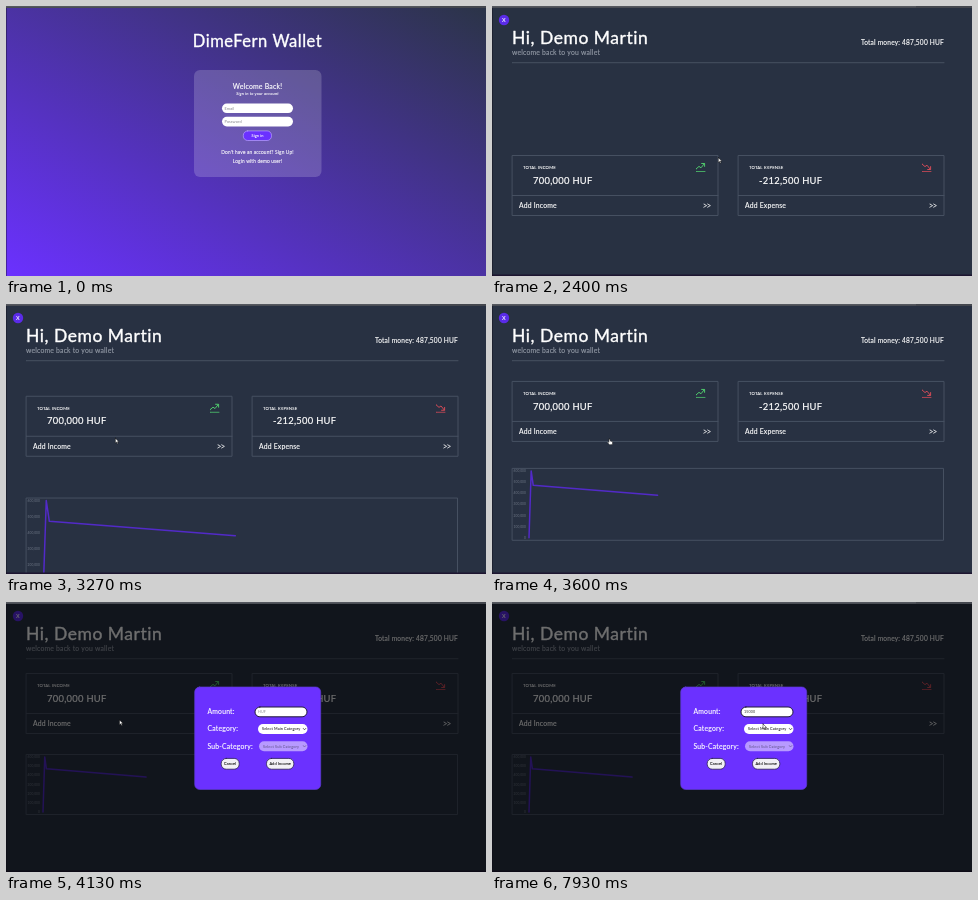
Animation, 480 px wide and 270 px high, one loop 8000 ms. Source, as an HTML page with a canvas:

```html
<!DOCTYPE html>
<html lang="en">
<head>
<meta charset="utf-8">
<title>Wallet demo</title>
<style>
html, body { margin: 0; width: 100%; height: 100%; overflow: hidden; background: #283142; }
canvas { display: block; width: 480px; height: 270px; }
</style>
</head>
<body>
<canvas id="stage"></canvas>
<script>
const LOOP = 8000, W = 480, H = 270;
const LOGIN_END = 2270, MODAL_START = 3970;
const canvas = document.getElementById('stage');
const ratio = window.devicePixelRatio || 1;
canvas.width = W * ratio;
canvas.height = H * ratio;
const ctx = canvas.getContext('2d');

const PURPLE = '#6b31ff', SLATE = '#283142', EDGE = '#465061';

// Pointer keys: time, x, y, shape used until the next key
const POINTER = [
  [1070, 306, 91, 'arrow'], [1330, 254, 153, 'hand'], [1870, 254, 153, 'hand'],
  [1930, 242, 154, 'hand'], [2270, 242, 154, 'arrow'], [2930, 89, 131, 'arrow'],
  [3400, 114, 135, 'hand'], [3600, 117, 135, 'hand'], [3930, 113.5, 118, 'arrow'],
  [4270, 113.5, 118, 'arrow'], [4480, 165, 172, 'arrow'], [4930, 269, 111, 'beam'],
  [6300, 269, 111, 'none'], [7730, 269, 113, 'arrow'], [7930, 271, 122, 'arrow'],
  [8000, 271, 122, 'arrow']
];
const KEYS = [5670, 6000, 6600, 7000, 7530];

const clamp = v => Math.max(0, Math.min(1, v));
const smooth = v => v * v * (3 - 2 * v);

function text(str, x, y, size, { color = '#fff', align = 'left', heavy = 0.022, style = '' } = {}) {
  ctx.font = `${style} ${size}px Lato, "Open Sans", sans-serif`;
  ctx.letterSpacing = size * 0.03 + 'px';
  ctx.textAlign = align;
  ctx.fillStyle = ctx.strokeStyle = color;
  ctx.fillText(str, x, y);
  if (heavy) {
    ctx.lineWidth = size * heavy;
    ctx.strokeText(str, x, y);
  }
}

function box(x, y, w, h, r, fill, stroke, line = 0.8) {
  ctx.beginPath();
  ctx.roundRect(x, y, w, h, r);
  if (fill) { ctx.fillStyle = fill; ctx.fill(); }
  if (stroke) { ctx.strokeStyle = stroke; ctx.lineWidth = line; ctx.stroke(); }
}

function path(points, stroke, width, fill) {
  ctx.beginPath();
  points.forEach(([x, y]) => ctx.lineTo(x, y));
  if (fill) { ctx.closePath(); ctx.fillStyle = fill; ctx.fill(); }
  ctx.strokeStyle = stroke;
  ctx.lineWidth = width;
  ctx.stroke();
}

function windowEdge() {
  ctx.fillStyle = '#44474e';
  ctx.fillRect(0, 0, W, 2);
  ctx.fillStyle = '#55585f';
  ctx.fillRect(0, 0, 424, 1.4);
  ctx.fillStyle = 'rgba(15,12,25,0.5)';
  ctx.fillRect(0, 2, 0.8, H);
}

function login(t) {
  const g = ctx.createLinearGradient(124.6, 340.1, 355.4, -70.1);
  g.addColorStop(0, PURPLE);
  g.addColorStop(1, '#2b3447');
  ctx.fillStyle = g;
  ctx.fillRect(0, 0, W, H);

  const mid = { align: 'center' };
  text('DimeFern Wallet', 251.5, 41.2, 16.5, mid);
  box(188, 64, 127.5, 107, 6, 'rgba(255,255,255,0.18)');
  text('Welcome Back!', 251.5, 83, 6.9, mid);
  text('Sign in to your account', 251.5, 89, 4.2, { align: 'center', style: 'italic' });
  ['Email', 'Password'].forEach((label, i) => {
    box(216, 97.5 + i * 13.3, 71, 9.6, 4.8, '#fff');
    text(label, 218.5, 103.7 + i * 13.3, 3.9, { color: '#85858c', heavy: 0 });
  });
  box(237.3, 124.9, 28.2, 9.6, 4.4, PURPLE, '#b9a2ff', 0.7);
  text('Sign in', 251.5, 131.1, 3.9, mid);
  text("Don't have an account? Sign Up!", 251.5, 148, 4.8, mid);
  text('Login with demo user!', 251.5, 157, 4.8, mid);
  if (t >= 1270) path([[227, 158], [276, 158]], '#fff', 0.6);
}

function trend(x, y, color, up) {
  const v = n => y + (up ? n : 7 - n);
  path([[x, v(6)], [x + 3, v(3.4)], [x + 5, v(4.8)], [x + 8.3, v(0.7)]], color, 1);
  path([[x + 5.4, v(0.5)], [x + 8.6, v(0.5)], [x + 8.6, v(3.4)]], color, 1);
  path([[x, y + 8.5], [x + 9, y + 8.5]], color, 0.8);
}

function account(x, y, name, total, color, up) {
  box(x + 0.5, y + 0.5, 205.5, 60, 0, null, EDGE, 1);
  path([[x, y + 40.5], [x + 206, y + 40.5]], EDGE, 1);
  text('TOTAL ' + name.toUpperCase(), x + 11, y + 14, 4.3);
  text(total, x + 21, y + 28.7, 9.4);
  text('Add ' + name, x + 7, y + 53.2, 6.8);
  // Plain chevrons, drawn apart so they stay open at this size
  for (const dx of [191.8, 195.6]) {
    path([[x + dx, y + 49], [x + dx + 2.8, y + 50.6], [x + dx, y + 52.2]], '#fff', 0.75);
  }
  trend(x + 184, y + 8, color, up);
}

function chart(y, h, w) {
  box(20.5, y + 0.5, 431, h, 0, null, EDGE, 1);
  const top = y + 3, span = h - 5;
  for (let i = 0; i <= 6; i++) {
    const label = i < 6 ? 600 - i * 100 + ',000' : '0';
    text(label, 34, top + span * i / 6 + 1.1, 3.2, { color: '#6f7887', align: 'right', heavy: 0 });
  }
  const line = [[0, 1], [0.017, 0], [0.033, 0.215], [1, 0.365]];
  path(line.map(([u, v]) => [37 + u * w, top + v * span]), '#522ac8', 1.5);
}

function dashboard(t) {
  ctx.fillStyle = SLATE;
  ctx.fillRect(0, 0, W, H);
  ctx.beginPath();
  ctx.arc(12, 14, 5.2, 0, 7);
  ctx.fillStyle = '#5a2be8';
  ctx.fill();
  text('X', 12, 16, 5.6, { align: 'center' });
  text('Hi, Demo Martin', 20, 38, 17.5);
  text('welcome back to you wallet', 20, 49.3, 6.8, { color: '#9299a5', heavy: 0.02 });
  text('Total money: 487,500 HUF', 452, 38.6, 6.6, { align: 'right' });
  path([[20, 56.7], [452, 56.7]], EDGE, 1);

  // The chart shrinks to rest and pulls the layout up with it
  const drop = Math.min(78, 44 * Math.max(0, (3930 - t) / 1000) ** 1.8);
  account(20, 71 + drop, 'Income', '700,000 HUF', '#4fc76c', true);
  account(246, 71 + drop, 'Expense', '-212,500 HUF', '#d04a57', false);
  chart(152 + 2 * drop, 60 + 2 * drop, 103 + 4.3 * drop);
  ctx.fillStyle = '#1d1530';
  ctx.fillRect(0, 268.5, W, 1.5);
}

function select(x, y, label, fill, color) {
  box(x, y, 301.5 - x, 10, 5, fill);
  text(label, x + 4, y + 6.3, 3.85, { color, heavy: 0.01 });
  path([[297.2, y + 4.4], [298.5, y + 5.8], [299.8, y + 4.4]], color, 0.7);
}

function modal(t) {
  const shown = clamp((t - MODAL_START) / 140);
  ctx.globalAlpha = shown;
  ctx.fillStyle = 'rgba(0,0,0,0.57)';
  ctx.fillRect(0, 2, W, H);
  box(188.7, 85, 126, 102.5, 5, PURPLE, '#5d3bd0', 0.7);
  text('Amount:', 201.5, 112.4, 6.8);
  text('Category:', 201.5, 129.4, 6.8);
  text('Sub-Category:', 201.5, 146.6, 6.8);

  box(249, 105, 52, 9.8, 4.9, '#fff', '#20183a', 1);
  const typed = '15000'.slice(0, KEYS.filter(k => t >= k).length);
  text(typed || 'HUF', 252, 111.3, 3.7, { color: typed ? '#333' : '#8a8a92', heavy: 0 });
  const caret = (t > 4930 && t < 5400) || (t >= 6000 && t < 6270) || (t >= 6800 && t < 7200);
  if (caret) {
    const x = 252.3 + (typed ? ctx.measureText(typed).width : 0);
    path([[x, 107.8], [x, 112]], '#222', 0.6);
  }

  select(252, 122, 'Select Main Category', '#fff', '#222');
  select(253, 139.2, 'Select Sub Category', '#b79aff', '#6a5b96');
  box(215.2, 156.4, 18, 10.8, 5, '#f1f0f5', '#2a1f55', 0.8);
  text('Cancel', 224.2, 163.2, 3.9, { color: '#111', align: 'center' });
  box(260.5, 156.4, 27.3, 10.8, 5, '#f1f0f5', '#2a1f55', 0.8);
  text('Add Income', 274.2, 163.2, 3.9, { color: '#111', align: 'center' });
  ctx.globalAlpha = 1;
}

const SHAPES = {
  arrow: () => path([[0, 0], [0, 4.8], [1.2, 3.8], [2, 5.6], [2.8, 5.2], [2, 3.5], [3.5, 3.4], [0, 0]], '#111', 0.5, '#fff'),
  hand: () => path([[0, 0], [1, 0], [1.2, 2], [3.6, 2.8], [3.4, 5.6], [0.6, 5.8], [-1.6, 3.4], [-1, 2.8], [0, 3.4], [0, 0]], '#222', 0.5, '#fff'),
  beam: () => {
    path([[0, -2.2], [0, 2.4]], '#222', 0.7);
    path([[-1, -2.4], [1, -2.4]], '#222', 0.5);
    path([[-1, 2.5], [1, 2.5]], '#222', 0.5);
  }
};

function pointer(t) {
  const i = POINTER.findIndex((k, n) => n + 1 < POINTER.length && t >= k[0] && t < POINTER[n + 1][0]);
  if (i < 0 || POINTER[i][3] === 'none') return;
  const [t0, x0, y0, shape] = POINTER[i], [t1, x1, y1] = POINTER[i + 1];
  const p = smooth((t - t0) / (t1 - t0));
  ctx.save();
  ctx.translate(x0 + (x1 - x0) * p, y0 + (y1 - y0) * p);
  SHAPES[shape]();
  ctx.restore();
}

function draw(t) {
  ctx.setTransform(ratio, 0, 0, ratio, 0, 0);
  ctx.lineJoin = ctx.lineCap = 'round';
  if (t < LOGIN_END) login(t);
  else dashboard(t);
  if (t >= MODAL_START) modal(t);
  windowEdge();
  pointer(t);
}

const start = performance.now();
function tick() {
  draw((performance.now() - start) % LOOP);
  requestAnimationFrame(tick);
}
tick();
</script>
</body>
</html>
```
